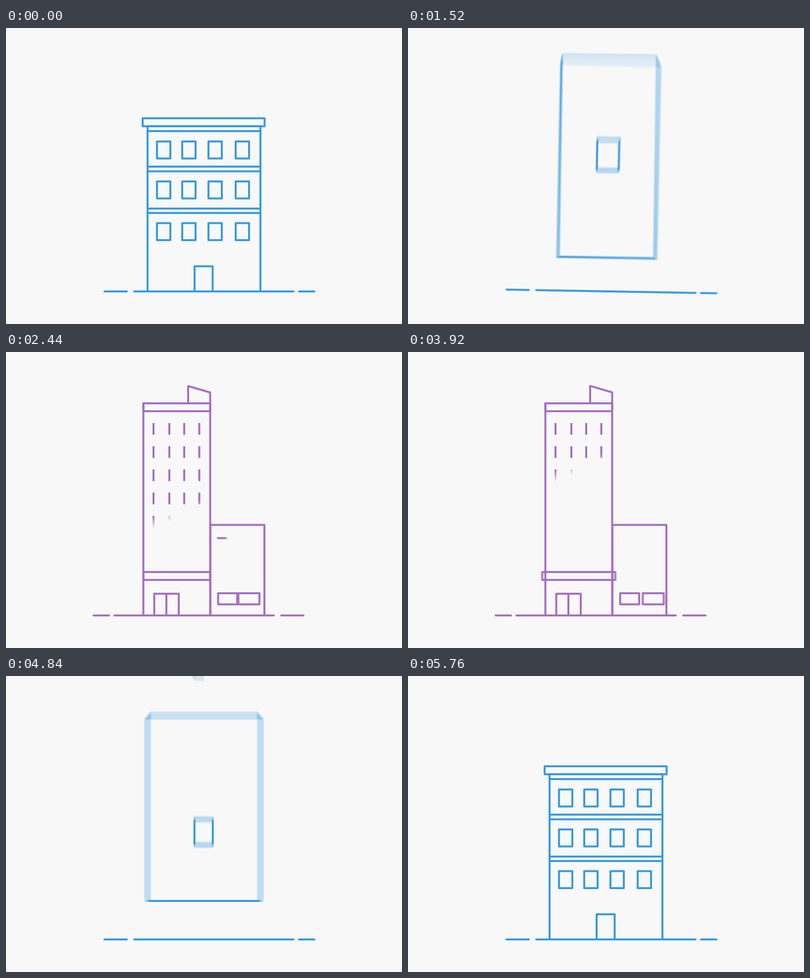
Recreate the animation shown at these times as an HTML page with a canvas. Size 800 by 600 pixels, loop 5.84 s.

```html
<!DOCTYPE html>
<html>
<head>
<meta charset="utf-8">
<style>
html, body { margin: 0; width: 100%; height: 100%; overflow: hidden; background: #f8f8f8; }
canvas { display: block; }
</style>
</head>
<body>
<canvas id="stage" width="800" height="600"></canvas>
<script>
const LOOP = 5840, STEP = 40, BUILD = 1200, SHUTTER = 16, SAMPLES = 15, GROUND = 534;
const BLUE = '#389ae0', PURPLE = '#a56fc2';
const screen = document.getElementById('stage').getContext('2d');
const newLayer = () => Object.assign(document.createElement('canvas'), { width: 800, height: 600 }).getContext('2d');
const pen = newLayer(), sum = newLayer();
pen.lineWidth = 4;
pen.lineJoin = 'round';

// Motion rules, all in milliseconds
const { PI, min, max, sin, cos, exp } = Math;
const clamp = v => min(1, max(0, v));
const fade = (age, life) => exp(-((age / life) ** 2));
const progress = (u, from, to) => clamp((u - from) / (to - from));
function smooth(u, from, to) {
  const p = progress(u, from, to);
  return p * p * (3 - 2 * p);
}
function toss(u, from, to, height) {
  const p = progress(u, from, to);
  return -height * 4 * p * (1 - p);
}
const wobble = (age, size, period, life) => size * sin(2 * PI * age / period) * fade(age, life);
const spring = (age, period, life) => age <= 0 ? 0 : 1 - cos(2 * PI * age / period) * fade(age, life);
const pop = age => spring(age, 338, 124);

function line(x0, y0, x1, y1, cap = 'butt') {
  pen.lineCap = cap;
  pen.beginPath();
  pen.moveTo(x0, y0);
  pen.lineTo(x1, y1);
  pen.stroke();
}

// Rectangle scaled about (ax, ay), then moved
function box(l, t, r, b, { sx = 1, sy = 1, ax = (l + r) / 2, ay = b, dx = 0, dy = 0 } = {}) {
  if (sx <= 0 && sy <= 0) return;
  pen.strokeRect(ax + (l - ax) * sx + dx, ay + (t - ay) * sy + dy, (r - l) * sx, (b - t) * sy);
}

function ground(u, cx, dashes) {
  const rise = 90 * (1 - progress(u, 45, 175)) ** 3;
  const tilt = 4.8 * (1 - smooth(u, 45, 265));
  pen.translate(cx, GROUND + rise);
  pen.rotate(tilt * PI / 180);
  pen.translate(-cx, -GROUND);
  dashes.forEach(([a, b]) => line(a, GROUND, b, GROUND, 'round'));
}

function drawHouse(u) {
  ground(u, 411, [[199, 244], [259, 581], [592, 623]]);

  // The landing squashes the whole house
  pen.translate(0, GROUND);
  pen.scale(1, 1 - wobble(max(0, u - 508), 0.095, 280, 151));
  pen.translate(0, -GROUND);

  const grow = spring(u - 70, 400, 145);
  if (grow) box(286, 199, 514, GROUND, { sx: 1 + wobble(u - 280, 0.25, 230, 130), sy: grow, dy: toss(u, 52, 508, 78) });

  const doorSize = pop(u - 50);
  box(381, 483, 417.5, GROUND, { sx: doorSize, sy: doorSize, dy: -0.67 * max(0, 566 - u) });

  [[199, 209], [281, 290.5], [366, 375]].forEach(([t, b], i) => {
    const sx = pop(u - 430 - 54 * i);
    if (sx) box(286, t, 514, b, { sx });
  });

  [230, 311, 395.5].forEach((y, row) => [305, 356, 409, 464].forEach((x, col) => {
    const age = u - 534 - 28 * ((3 - col) * 3 + row);
    box(x, y, x + 27, y + 34.5, { sx: spring(age, 200, 90), sy: spring(age - 30, 300, 130), ax: x + 27, ay: y });
  }));

  const fall = 1 - smooth(u, 150, 550);
  pen.translate(399.25, 191 - 420 * fall + wobble(max(0, u - 520), 3, 200, 100));
  pen.rotate(130 * fall * PI / 180);
  box(-123.25, -8, 123.25, 8.3);
}

function drawTower(u) {
  ground(u, 389, [[177, 208], [219, 541], [556, 601]]);

  const grow = spring(u - 60, 400, 129), slide = 1 - smooth(u, 60, 260);
  if (grow) {
    const door = { sy: grow, dy: toss(u, 140, 400, 27) };
    box(277.5, 104, 412.5, GROUND, { sx: 1 - wobble(u - 171, 0.51, 300, 130), sy: grow });
    box(413, 350.5, 522, GROUND, { sx: grow, sy: spring(u - 60, 400, 95), dx: -45 * slide, dy: toss(u, 60, 340, 180) });
    box(299.5, 490, 324, GROUND, { ...door, dx: 60 * slide });
    box(324, 490, 349, GROUND, door);
  }

  const cornice = pop(u - 330), cabin = pop(u - 400), band = pop(u - 452), pane = pop(u - 380);
  if (cornice) box(277.5, 104, 412.5, 120, { sx: cornice });
  if (band) box(277.5, 446, 412.5, 462, { sx: band });
  if (cabin) {
    pen.beginPath();
    pen.moveTo(368, 104);
    pen.lineTo(368, 104 - 35 * cabin);
    pen.lineTo(412.5, 104 - 22 * cabin);
    pen.lineTo(412.5, 104);
    pen.stroke();
  }
  if (pane) {
    box(428.5, 489, 467, 511.5, { sx: pane });
    box(469.5, 489, 512, 511.5, { sx: pane, dx: 50 * max(0, band - 1) });
  }

  for (let i = 0; i < 24; i++) {
    const x = [298, 330, 360, 390.5][i % 4], y = 144 + 47 * (i >> 2);
    const start = 551 + 10 * i, grown = progress(u, start, start + 16);
    if (grown) line(x, y, x, y + 23.7 * grown);
  }
  for (let i = 0; i < 4; i++) {
    const start = 635 + 95 * i, grown = smooth(u, start, start + 280), y = 377.3 + 26.8 * i;
    if (grown) line(426.5, y, 426.5 + 87 * grown, y);
  }
}

// Each building is taken down by running its construction backwards
function sceneAt(t) {
  if (t < 1720) return [drawHouse, BLUE, 1720 - t];
  if (t < 3140) return [drawTower, PURPLE, t - 1720];
  if (t < 4560) return [drawTower, PURPLE, 4560 - t];
  return [drawHouse, BLUE, t - 4560];
}

// Averages several moments within the shutter time, then tints the result
function render(t) {
  const [draw, color, u] = sceneAt(t);
  const count = u >= BUILD ? 1 : SAMPLES;
  sum.globalCompositeOperation = 'source-over';
  sum.globalAlpha = 1;
  sum.clearRect(0, 0, 800, 600);
  sum.globalCompositeOperation = 'lighter';
  sum.globalAlpha = 1 / count;
  for (let k = 0; k < count; k++) {
    pen.clearRect(0, 0, 800, 600);
    pen.save();
    draw(count === 1 ? u : u + SHUTTER * (k / (count - 1) - 0.5));
    pen.restore();
    sum.drawImage(pen.canvas, 0, 0);
  }
  sum.globalAlpha = 1;
  sum.globalCompositeOperation = 'source-in';
  sum.fillStyle = color;
  sum.fillRect(0, 0, 800, 600);
  screen.fillStyle = '#f8f8f8';
  screen.fillRect(0, 0, 800, 600);
  screen.drawImage(sum.canvas, 0, 0);
}

const start = performance.now();
let shown = -1;
function tick() {
  const t = Math.floor((performance.now() - start) % LOOP / STEP) * STEP;
  if (t !== shown) render(shown = t);
  requestAnimationFrame(tick);
}
tick();
</script>
</body>
</html>
```
